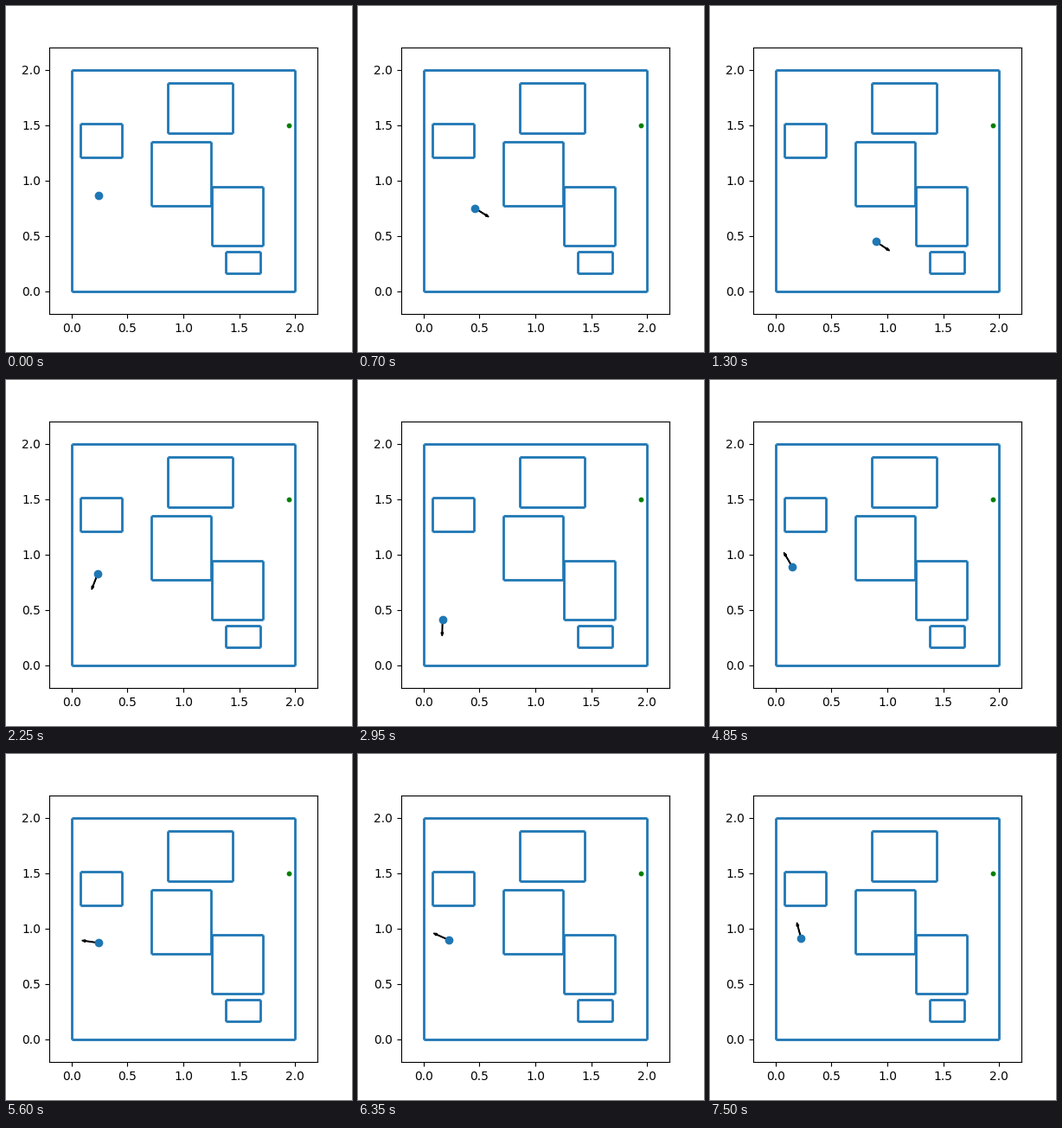
A matplotlib script that plays this animation: 400x400 px, repeating every 7.55 s.

```python
import numpy as np
import matplotlib.pyplot as plt
from matplotlib.animation import FuncAnimation
from matplotlib.collections import LineCollection

FRAMES, INTERVAL = 151, 50
BLUE = "#1f77b4"
START = (0.239, 0.866)
GOAL = (1.945, 1.493)
FIRST_MOVE = 2

# x0, y0, x1, y1: the outer wall, then the obstacles
BOXES = [
    (0, 0, 2, 2),
    (0.076, 1.204, 0.454, 1.516),
    (0.861, 1.430, 1.445, 1.883),
    (0.717, 0.766, 1.246, 1.352),
    (1.256, 0.414, 1.716, 0.938),
    (1.380, 0.157, 1.687, 0.359),
]

# Each run leaves START at rest and ends at a wall: (step, x, y, heading)
RUNS = [
    [(FIRST_MOVE, *START, -38), (26, 0.896, 0.448, -34),
     (33, 1.174, 0.203, -45), (39, 1.465, -0.012, -15)],
    [(40, *START, 225), (45, 0.233, 0.822, 249), (65, 0.191, 0.235, 285),
     (73, 0.306, 0.073, 333), (83, 0.644, -0.004, 338)],
    [(84, *START, 200), (97, 0.149, 0.887, 120), (108, -0.003, 1.172, 115)],
    [(109, *START, 150), (127, 0.226, 0.895, 516),
     (139, 0.106, 0.844, 610), (145, -0.010, 0.883, 480)],
    [(146, *START, 95), (150, 0.229, 0.907, 105)],
]


def pose(step):
    """Position and heading on the run active at this step."""
    run = np.array([r for r in RUNS if r[0][0] <= step][-1])
    t, p = run[:, 0], run[:, 1:]
    slope = np.gradient(p, t, axis=0)
    slope[0] = 0
    i = min(np.searchsorted(t, step, side="right") - 1, len(t) - 2)
    h = t[i + 1] - t[i]
    s = (step - t[i]) / h
    # cubic Hermite segment
    x, y, deg = ((1 + 2 * s) * (1 - s) ** 2 * p[i] + s * (1 - s) ** 2 * h * slope[i]
                 + s * s * (3 - 2 * s) * p[i + 1] + s * s * (s - 1) * h * slope[i + 1])
    return x, y, np.radians(deg)


def sides(x0, y0, x1, y1):
    pts = [(x0, y0), (x1, y0), (x1, y1), (x0, y1)]
    return list(zip(pts, pts[1:] + pts[:1]))


fig, ax = plt.subplots(figsize=(4, 4), dpi=100)
ax.add_collection(LineCollection([s for b in BOXES for s in sides(*b)], colors=BLUE, lw=2))
ax.scatter(*GOAL, s=10, color="g", zorder=3)
robot = ax.scatter(*START, s=36, color=BLUE, zorder=3)
arrow = ax.arrow(*START, 0.12, 0, width=0.005, head_width=0.02, head_length=0.03, color="k")
ax.set(xlim=(-0.2, 2.2), ylim=(-0.207, 2.2))


def update(step):
    x, y, a = pose(max(step, FIRST_MOVE))
    robot.set_offsets([(x, y)])
    arrow.set_data(x=x, y=y, dx=0.12 * np.cos(a), dy=0.12 * np.sin(a))
    arrow.set_visible(step >= FIRST_MOVE)
    return robot, arrow


anim = FuncAnimation(fig, update, frames=FRAMES, interval=INTERVAL,
                     init_func=lambda: update(0), repeat=True, repeat_delay=0)
plt.show()
```
